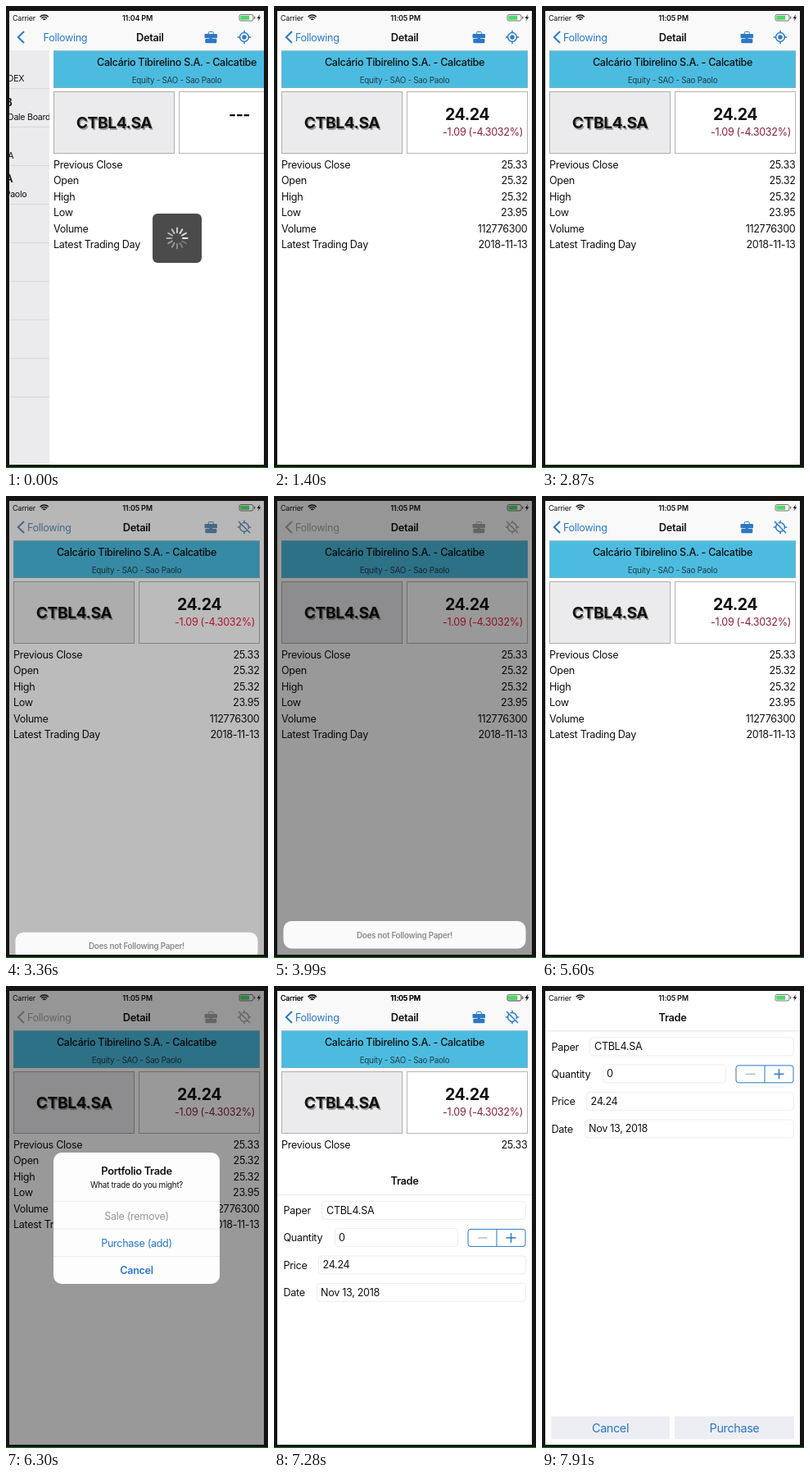
An HTML page with a canvas for the animation above (8 s loop, 320x563 px).

```html
<!DOCTYPE html>
<html lang="en">
<head>
<meta charset="utf-8">
<title>Stock detail</title>
<style>
html, body { margin: 0; width: 100%; height: 100%; overflow: hidden; background: #151412; }
canvas { display: block; width: 320px; height: 563px; }
</style>
</head>
<body>
<canvas id="stage"></canvas>
<script>
const LOOP = 8000;
const W = 320, H = 563;
const SCREEN = { x: 4, y: 6, w: 311, h: 553 };
const BLUE = [43, 120, 197], GRAY = [168, 168, 168];
const INK = '#111', LINK = 'rgb(43,120,197)';
const TICKER = 'CTBL4.SA';
const ROWS = [
  ['Previous Close', '25.33'], ['Open', '25.32'], ['High', '25.32'],
  ['Low', '23.95'], ['Volume', '112776300'], ['Latest Trading Day', '2018-11-13']
];
const TIMES = {
  loaded: 630, minute: 910, unfollow: 3120,
  sheetIn: 3185, sheetOut: 4635, alertIn: 5600, alertOut: 6700, form: 7100
};

const canvas = document.getElementById('stage');
const ctx = canvas.getContext('2d');
const ratio = window.devicePixelRatio || 1;
canvas.width = W * ratio;
canvas.height = H * ratio;

// Critically damped spring from 0 to 1.
function spring(t, start, speed) {
  const s = Math.max(0, t - start) / 1000 * speed;
  return 1 - (1 + s) * Math.exp(-s);
}

function mix(a, b, k) {
  return `rgb(${a.map((v, i) => Math.round(v + (b[i] - v) * k)).join(',')})`;
}

function text(str, x, y, { size = 12.6, weight = 400, color = INK, align = 'left' } = {}) {
  ctx.font = `${weight} ${size}px Inter, sans-serif`;
  ctx.letterSpacing = `${-0.025 * size}px`;
  ctx.textAlign = align;
  ctx.textBaseline = 'alphabetic';
  ctx.fillStyle = color;
  ctx.fillText(str, x, y + size * 0.36);
}

function rect(x, y, w, h, fill, stroke) {
  ctx.fillStyle = fill;
  ctx.fillRect(x, y, w, h);
  if (stroke) {
    ctx.strokeStyle = stroke;
    ctx.lineWidth = 1;
    ctx.strokeRect(x + 0.5, y + 0.5, w - 1, h - 1);
  }
}

function roundRect(x, y, w, h, r, fill, stroke) {
  ctx.beginPath();
  ctx.roundRect(x, y, w, h, r);
  if (fill) { ctx.fillStyle = fill; ctx.fill(); }
  if (stroke) { ctx.strokeStyle = stroke; ctx.lineWidth = 1; ctx.stroke(); }
}

function line(points, color, width = 1) {
  ctx.beginPath();
  points.forEach(([x, y], i) => i ? ctx.lineTo(x, y) : ctx.moveTo(x, y));
  ctx.strokeStyle = color;
  ctx.lineWidth = width;
  ctx.stroke();
}

function group(x, y, draw) {
  ctx.save();
  ctx.translate(x, y);
  draw();
  ctx.restore();
}

function drawStatus(t) {
  text('Carrier', 8, 14.5, { size: 9 });
  ctx.strokeStyle = INK;
  ctx.lineWidth = 1.5;
  for (const r of [2.2, 4.7, 7.2]) {
    ctx.beginPath();
    ctx.arc(46.7, 18.3, r, -Math.PI * 0.75, -Math.PI * 0.25);
    ctx.stroke();
  }
  text(t < TIMES.minute ? '11:04 PM' : '11:05 PM', 160.5, 14.5, { size: 9, weight: 600, align: 'center' });
  roundRect(285, 10.5, 17, 7.5, 2, null, '#777');
  roundRect(286.2, 11.7, 11, 5.1, 1, '#4cd964');
  rect(303, 12.7, 1.3, 3, '#777');
  ctx.beginPath();
  [[310, 10], [306.7, 14.9], [308.8, 14.9], [307.7, 18.6], [311.2, 13.6], [309, 13.6]]
    .forEach(p => ctx.lineTo(...p));
  ctx.fillStyle = INK;
  ctx.fill();
}

function drawBriefcase(color) {
  roundRect(247.3, 31.5, 6, 4, 1, null, color);
  roundRect(242.5, 34, 15.5, 5.3, 1.2, color);
  roundRect(243.3, 40, 14, 5.3, 1.2, color);
  rect(248.6, 38, 3.2, 3.4, color);
}

function drawTarget(color, crossed) {
  group(291, 38, () => {
    ctx.beginPath();
    ctx.arc(0, 0, 5.4, 0, Math.PI * 2);
    ctx.strokeStyle = color;
    ctx.lineWidth = 1.5;
    ctx.stroke();
    for (const [x, y] of [[1, 0], [-1, 0], [0, 1], [0, -1]]) {
      line([[x * 5.4, y * 5.4], [x * 8.3, y * 8.3]], color, 1.5);
    }
    if (crossed) {
      line([[-6, -7.5], [8, 6.5]], '#f8f8f8', 1.4);
      line([[-7, -7], [7, 7]], color, 1.5);
    } else {
      ctx.beginPath();
      ctx.arc(0, 0, 2.7, 0, Math.PI * 2);
      ctx.fillStyle = color;
      ctx.fill();
    }
  });
}

function drawNav(t, push, tint) {
  rect(4, 6, 311, 48, '#f9f9f9');
  drawStatus(t);
  line([[22, 31], [14.8, 38], [22, 45]], tint, 2);
  text('Following', 26 + push * 0.4, 38, { color: tint });
  text('Detail', 159.5 + push / 3, 38, { size: 12.8, weight: 600, align: 'center' });
  drawBriefcase(tint);
  drawTarget(tint, t >= TIMES.unfollow);
}

// The previous screen, sliding left under the detail page.
function drawList(push) {
  rect(4, 54, 311, 505, '#ebebed');
  group((push - 48) * 0.3, 0, () => {
    for (let y = 53.5; y < 500; y += 47) line([[-90, y], [315, y]], '#d8d8da');
    const small = { size: 10.6, align: 'right' };
    const bold = { size: 12.8, weight: 600, align: 'right' };
    text('DEX', 22, 88, small);
    text('B', 7, 117, bold);
    text('Dale Board', 54, 135, small);
    text('A', 9, 182, small);
    text('A', 8, 210, bold);
    text('Sao Paolo', 25, 229, small);
  });
}

function drawSpinner(t) {
  roundRect(130, 253, 60, 60, 6, '#4b4b4b');
  group(160, 283, () => {
    const lead = Math.floor(t / 1000 * 12);
    ctx.lineCap = 'round';
    for (let i = 0; i < 12; i++) {
      const age = ((lead - i) % 12 + 12) % 12;
      const a = i * Math.PI / 6;
      const c = Math.cos(a), s = Math.sin(a);
      line([[c * 7, s * 7], [c * 12.5, s * 12.5]], `rgba(255,255,255,${0.9 - age * 0.06})`, 2);
    }
  });
}

function drawDetail(t) {
  const loaded = t >= TIMES.loaded;
  rect(4, 54, 312, 506, '#fff');
  rect(9, 54.5, 301, 45.5, '#4bbce0', '#79b3c5');
  text('Calcário Tibirelino S.A. - Calcatibe', 159.5, 68, { weight: 500, align: 'center' });
  text('Equity - SAO - Sao Paolo', 159.5, 90, { size: 9.8, color: '#263c44', align: 'center' });

  rect(9, 104, 148, 76, '#ebebed', '#adadad');
  const label = { size: 19.3, weight: 700, align: 'center' };
  text(TICKER, 84.5, 143.8, { ...label, color: '#999' });
  text(TICKER, 83, 142.5, label);

  rect(162, 104, 148, 76, '#fff', '#b5b5b5');
  text(loaded ? '24.24' : '---', 236, 132, { ...label, size: 19.6 });
  if (loaded) {
    const bright = t > TIMES.sheetIn && t < TIMES.sheetOut + 400;
    text('-1.09 (-4.3032%)', 304, 153.5, { color: bright ? '#ee1c3c' : '#86213c', align: 'right' });
  }
  ROWS.forEach(([name, value], i) => {
    const y = 193 + i * 19.5;
    text(name, 9, y);
    if (loaded) text(value, 309.5, y, { align: 'right' });
  });
  if (!loaded) drawSpinner(t);
}

function drawDim(amount) {
  if (amount > 0.002) rect(4, 6, 311, 553, `rgba(0,0,0,${0.4 * amount})`);
}

function drawSheet(level) {
  if (level < 0.01) return;
  const y = 559 - 41 * level;
  roundRect(11.5, y, 296, 33.5, 10, '#fafafa');
  text('Does not Following Paper!', 159.5, y + 17, { size: 9.8, weight: 600, color: '#8c8c8c', align: 'center' });
}

function drawAlert(enter, leave) {
  const alpha = enter * (1 - leave);
  if (alpha < 0.01) return;
  const scale = 1 + 0.2 * (1 - enter);
  ctx.save();
  ctx.globalAlpha = alpha;
  ctx.translate(159.5, 283);
  ctx.scale(scale, scale);
  ctx.translate(-159.5, -283);
  roundRect(58, 203, 203, 160, 10, '#fdfdfd');
  for (const y of [262.5, 296, 329.5]) line([[58, y], [261, y]], '#ececec');
  const item = (str, y, style) => text(str, 159.5, y, { align: 'center', ...style });
  item('Portfolio Trade', 225.5, { size: 12.8, weight: 600 });
  item('What trade do you might?', 242, { size: 9.8 });
  item('Sale (remove)', 280, { color: '#969696' });
  item('Purchase (add)', 313.5, { color: LINK });
  item('Cancel', 346.5, { weight: 600, color: LINK });
  ctx.restore();
}

function drawField(label, value, y, left, right, valueX) {
  text(label, 11.5, y);
  roundRect(left + 0.5, y - 11.5, right - left, 22, 4, '#fff', '#ededed');
  text(value, valueX, y - 0.5);
}

function drawButton(label, x, w) {
  rect(x, 524, w, 28, '#ededf4');
  text(label, x + w / 2, 538, { size: 14.4, color: LINK, align: 'center' });
}

function drawForm(t, offset) {
  group(0, offset, () => {
    rect(4, 7, 311, 553, '#fff');
    text('Trade', 159.5, 38, { size: 12.8, weight: 600, align: 'center' });
    line([[4, 54.5], [315, 54.5]], '#e6e6e6');
    drawField('Paper', TICKER, 74, 58, 307, 64);
    drawField('Quantity', '0', 107, 74, 224, 79);
    drawField('Price', '24.24', 140.5, 54, 307, 59.5);
    drawField('Date', 'Nov 13, 2018', 174, 52, 307, 57);
    roundRect(237, 96.5, 70, 21, 3, '#fff', LINK);
    line([[272, 96.5], [272, 117.5]], LINK);
    line([[249, 107], [260.5, 107]], '#9db8d2', 1.3);
    line([[283.5, 107], [295.5, 107]], LINK, 1.5);
    line([[289.5, 101], [289.5, 113]], LINK, 1.5);
    drawButton('Cancel', 11, 145);
    drawButton('Purchase', 162, 146);
  });
  drawStatus(t);
}

function draw(t) {
  ctx.setTransform(ratio, 0, 0, ratio, 0, 0);
  rect(0, 0, W, H, '#151412');
  rect(0, 562, W, 1, '#0b7a16');

  const push = 312 * (1 - spring(t, -275, 12));
  const sheet = spring(t, TIMES.sheetIn, 13) * (1 - spring(t, TIMES.sheetOut, 9));
  const alertIn = spring(t, TIMES.alertIn, 14);
  const alertOut = spring(t, TIMES.alertOut, 17);
  const dim = Math.max(sheet, alertIn * (1 - alertOut));

  ctx.save();
  ctx.beginPath();
  ctx.rect(SCREEN.x, SCREEN.y, SCREEN.w, SCREEN.h);
  ctx.clip();
  drawList(push);
  group(push, 0, () => drawDetail(t));
  drawNav(t, push, mix(BLUE, GRAY, dim * dim));
  drawDim(dim);
  drawSheet(sheet);
  drawAlert(alertIn, alertOut);
  if (t >= TIMES.form) drawForm(t, 553 * (1 - spring(t, TIMES.form, 12)));
  ctx.restore();
}

const origin = performance.now();
function tick() {
  draw((performance.now() - origin) % LOOP);
  requestAnimationFrame(tick);
}
tick();
</script>
</body>
</html>
```
